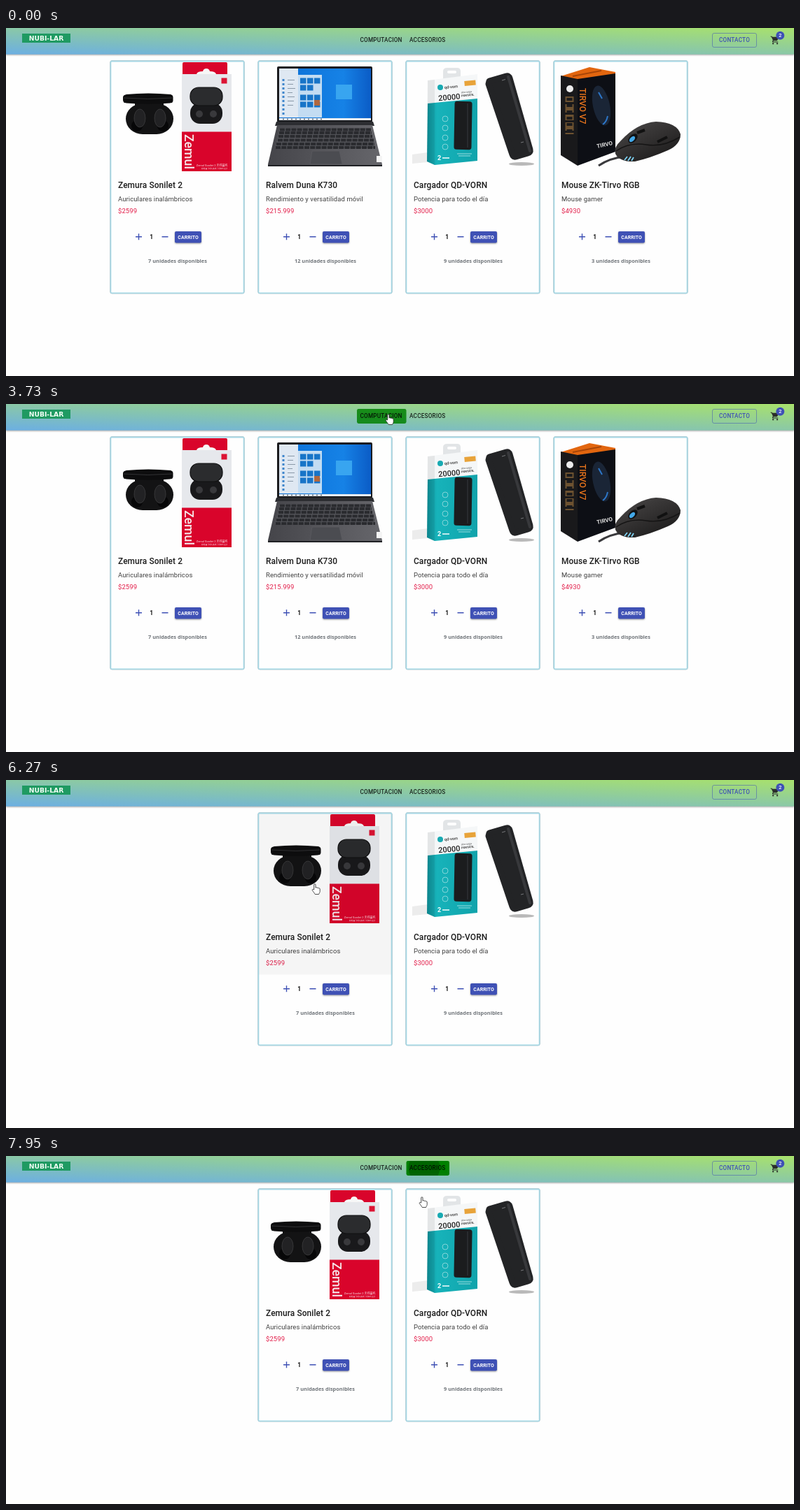
Recreate the animation shown at these times as an HTML page. Size 1125x498 px, loop 8000 ms.

```html
<!DOCTYPE html>
<html lang="es">
<head>
<meta charset="utf-8">
<style>
html, body { margin: 0; width: 100%; height: 100%; overflow: hidden; background: #fefefe; }
svg { display: block; font-family: Roboto, sans-serif; }
.units { font: 700 7.4px "Open Sans", sans-serif; fill: #70757a; }
.card { fill: #fefefe; stroke: #a6d8e5; stroke-width: 1.8; filter: drop-shadow(0 .8px .5px rgba(0,0,0,.4)); }
.btn { fill: #3f51b5; filter: drop-shadow(0 1px .8px rgba(0,0,0,.4)); }
</style>
</head>
<body>
<svg id="stage" width="1125" height="498" viewBox="0 0 1125 498">
<defs>
  <linearGradient id="bar" x1="0" y1="1" x2="1" y2="0"><stop stop-color="#6cafe2"/><stop offset="1" stop-color="#a8e16c"/></linearGradient>
  <linearGradient id="deck"><stop stop-color="#45454a"/><stop offset="1" stop-color="#66666b"/></linearGradient>
  <linearGradient id="screen"><stop stop-color="#0a6fd6"/><stop offset=".7" stop-color="#1682e6"/><stop offset="1" stop-color="#0b5cc6"/></linearGradient>
  <linearGradient id="teal"><stop stop-color="#0d8f98"/><stop offset=".2" stop-color="#17b3ba"/><stop offset="1" stop-color="#10a3ab"/></linearGradient>
  <linearGradient id="shell" x2=".8" y2="1"><stop stop-color="#4c4a4a"/><stop offset=".5" stop-color="#343232"/><stop offset="1" stop-color="#1a1919"/></linearGradient>

  <!-- earbuds and their box -->
  <g id="p0">
    <rect x="171" y="108" width="68" height="44" rx="24" ry="22" fill="#131314"/>
    <path d="M184 106H225V112H184Z" fill="#131314"/>
    <path d="M172 95Q203 92 235 95Q238.500 96 238.500 99V104Q238.500 107 234 107.500Q203 110 172 107.500Q167 107 167 103V99Q167 96 172 95Z" fill="#0d0d0e"/>
    <path d="M168 100Q203 103 237 100" fill="none" stroke="#3c3c3e" stroke-width=".8"/>
    <circle cx="187" cy="140" r="8" fill="#070708"/><circle cx="224" cy="140" r="8" fill="#070708"/>
    <g fill="#222224" stroke="#48484b" stroke-width=".6"><ellipse cx="191" cy="129" rx="8" ry="13"/><ellipse cx="220" cy="129" rx="8" ry="13"/></g>
    <path d="M252 67V51Q252 49 254 49H314Q316 49 316 51V67Z" fill="#d9042b"/>
    <path d="M251 66H322V150H251Z" fill="#e6e8ec"/>
    <path d="M272 66Q273 62 281 62Q282 58 286 58T291 62Q299 62 300 66Z" fill="#f7f7f7"/>
    <rect x="251" y="148.500" width="71" height="56.500" fill="#d9042b"/>
    <rect x="307.500" y="71.500" width="8" height="8" fill="#dc1433"/>
    <rect x="263" y="107" width="46" height="30" rx="14" fill="#19191b"/>
    <rect x="263" y="85" width="46" height="26" rx="12" fill="#2b2c2e" stroke="#101011" stroke-width="1.200"/>
    <circle cx="276" cy="123" r="5" fill="#39393c"/><circle cx="296" cy="123" r="5" fill="#39393c"/>
    <text transform="translate(255 152) rotate(90)" font-size="17.800" font-weight="500" fill="#f6e6e8">Zemul</text>
    <g fill="#f8dfe3" text-anchor="end" font-family="Roboto, 'Noto Sans CJK SC', sans-serif">
      <text x="316.500" y="198" font-size="4">Zemul Sonilet 2 无线耳机</text>
      <text x="316.500" y="202" font-size="2.800">充电盒 | 持久续航 | 分体式设计</text>
    </g>
  </g>

  <!-- laptop -->
  <g id="p1">
    <rect x="387" y="55" width="136" height="80" rx="2" fill="#1a1b1e"/>
    <rect x="390" y="58" width="131" height="74" fill="url(#screen)"/>
    <path d="M390 58h27v70h-27z" fill="#dfe8f2"/>
    <path d="M417 67h34v61h-34z" fill="#c3dcf2"/>
    <path d="M396 73v52" stroke="#3f86cc" stroke-width="3" stroke-dasharray="3 3"/>
    <path d="M402 74.500h10M402 80.500h8M402 86.500h11M402 92.500h7M402 98.500h10M402 104.500h9M402 110.500h8" stroke="#8a99a8"/>
    <path d="M420 75.500h30M420 85.500h20M420 99.500h30M420 109.500h30" stroke="#1774c8" stroke-width="8" stroke-dasharray="8.500 1.500"/>
    <rect x="440" y="103" width="8" height="8" fill="#b1683f"/>
    <rect x="471" y="81" width="23" height="21" fill="#38a5f0"/>
    <path d="M390 130.500h131" stroke="#e9edf1" stroke-width="3"/>
    <path d="M395 130.500h56" stroke="#58626c" stroke-width="1.500" stroke-dasharray="2 4"/>
    <path d="M386 134h138l2 6H384z" fill="#2c2d31"/>
    <path d="M387 139H523L537 195V198H374V195Z" fill="url(#deck)"/>
    <path d="M391 143H520L527 172H384Z" fill="#525358"/>
    <path d="M391 145.500H521M390 150H522M389 155H523M388 160.500H525M386 166H526M385 171H527" stroke="#2a2b2f" stroke-width="3.800" stroke-dasharray="7 1.200"/>
    <path d="M437 176H476L480 195H434Z" fill="#4b4c51" stroke="#606167" stroke-width=".5"/>
    <path d="M374 197h163" stroke="#202125" stroke-width="2"/>
    <rect x="529" y="183" width="8" height="9" fill="#f4f4f4"/>
  </g>

  <!-- power bank and its box -->
  <g id="p2">
    <path d="M580 181L602 178V192L580 194Z" fill="#ececec"/>
    <path d="M624 73V62Q624 57 630 57H644Q649 57 649 62V70Z" fill="#e2e5e7"/><rect x="630" y="61" width="13" height="4" rx="2" fill="#fff"/>
    <path d="M602 75L673 66V190L612 196L601 191Z" fill="#f5f7f8"/>
    <path d="M602 108L673 101V190L612 196L601 191Z" fill="url(#teal)"/>
    <path d="M602 75L612 74V196L601 191Z" fill="#000" opacity=".07"/>
    <circle cx="620" cy="85" r="4" fill="#18aab2"/>
    <g transform="rotate(-5 620 86)"><text x="626" y="87.500" font-size="5.600" font-weight="500" fill="#333">qd-vorn</text>
      <rect x="655" y="79" width="16" height="7" fill="#e8a33a"/>
      <text x="616" y="104" font-size="11" font-weight="500" fill="#222">20000</text>
      <text x="649" y="96" font-size="3.500" fill="#444">alta carga</text><text x="649" y="101" font-size="4" font-weight="700" fill="#333">PORTÁTIL</text></g>
    <rect x="640" y="105" width="25" height="69" rx="3.500" fill="#1b1c1e" transform="rotate(1 652 140)"/>
    <path d="M659 108V171" stroke="#393b3e" stroke-width="1"/>
    <path d="M644 180h21M646 183h17" stroke="#9adcdf"/>
    <g fill="none" stroke="#82d5d9"><circle cx="627" cy="130" r="4"/><circle cx="627" cy="143" r="4"/><circle cx="627" cy="157" r="4"/><circle cx="627" cy="170" r="4"/></g>
    <text x="616" y="189" font-size="9" font-weight="700" fill="#fff">2</text><path d="M623 186h10" stroke="#bfe9eb" stroke-width="2"/>
    <ellipse cx="736" cy="194.500" rx="18" ry="2.500" fill="#b9b9b9"/>
    <path d="M690 76L714 69Q718 68 719 72L748 174Q749 178 745 179L728 184Q724 185 723 181L689 80Z" fill="#232426" stroke="#232426" stroke-width="9" stroke-linejoin="round"/>
    <path d="M717 70L748 176" stroke="#38393c" stroke-width="4" stroke-linecap="round"/>
    <path d="M708 75l5-1.500M735 164l4-1" stroke="#77797c"/>
  </g>

  <!-- mouse and its box -->
  <g id="p3">
    <path d="M792 69L833 56L870 63V70L816 75Z" fill="#e2660f"/>
    <path d="M809 69L850 61" stroke="#a84608" stroke-width="2"/>
    <path d="M792 68L816 73V197L792 182Z" fill="#19191b"/>
    <path d="M816 73L870 65V177L816 197Z" fill="#0d0f15"/>
    <circle cx="805" cy="87" r="5" fill="#ededed"/>
    <path d="M804.500 98V152" stroke="#6d5230" stroke-width="12" stroke-dasharray="8 3 12 3"/>
    <path d="M804.500 100V150" stroke="#1b1b1d" stroke-width="8" stroke-dasharray="4 5"/>
    <ellipse cx="850" cy="111" rx="12" ry="29" fill="#1a2536" transform="rotate(-12 850 111)"/>
    <path d="M846 92l5 9M859 126q-2 9-7 12" stroke="#2d76c8" stroke-width="2" fill="none"/>
    <text transform="translate(819 86) rotate(90)" font-size="12" font-weight="500" fill="#e8741c">TIRVO V7</text>
    <text transform="translate(844 172) rotate(-12)" font-size="8" font-weight="700" fill="#ddd">TIRVO</text>
    <path d="M884 184Q862 186 846 197" fill="none" stroke="#3a3a3d" stroke-width="3"/>
    <path d="M870 180Q867 171 878 161Q901 136 928 134Q958 135 963 152Q963 167 945 175Q920 186 898 191Q876 192 870 180Z" fill="url(#shell)"/>
    <path d="M871 176Q890 163 914 167T962 156" fill="none" stroke="#151414" stroke-width="1.500"/>
    <path d="M901 150L912 146M930 163L944 156" stroke="#111" stroke-width="4"/>
    <ellipse cx="895" cy="158" rx="8" ry="5" fill="#101113" transform="rotate(-45 895 158)"/>
    <ellipse cx="894" cy="159" rx="5" ry="3" fill="#42a8e8" transform="rotate(-45 894 159)"/>
    <path d="M883 189l4-5M888 190l4-6M893 190l3-5" stroke="#7fd4f5" stroke-width="1.800"/>
  </g>

  <g id="qty">
    <path d="M185 298.700h9M189.500 294.200v9M222.500 298.700h9" stroke="#3f51b5" stroke-width="1.400"/>
    <text x="207.700" y="302.300" text-anchor="middle" font-size="8.400" font-weight="700" fill="#111">1</text>
    <rect class="btn" x="241" y="291" width="38" height="16.500" rx="2"/>
    <text x="260.100" y="301.800" text-anchor="middle" font-size="6.900" font-weight="700" letter-spacing=".12" fill="#fff">CARRITO</text>
  </g>
  <clipPath id="navClip"><path id="navBox"/></clipPath>
</defs>
<g id="pages"></g>
<rect id="shade" y="48" width="189" height="230.500"/>
<rect width="1125" height="37.700" fill="url(#bar)" style="filter:drop-shadow(0 1px 1.200px rgba(0,0,0,.35))"/>
<rect x="23" y="8" width="69" height="13" fill="#1f9a62"/>
<text x="57.500" y="18" text-anchor="middle" font-size="9.200" style="font-family:'DejaVu Sans',sans-serif;font-weight:700" fill="#f2fff6">NUBI-LAR</text>
<rect id="nav0" x="501" y="7" width="70.500" height="21" rx="2.400" fill="#008000"/>
<rect id="nav1" x="571.500" y="7" width="61.500" height="21" rx="2.400" fill="#008000"/>
<g clip-path="url(#navClip)"><circle id="ripple" cy="17"/></g>
<g font-size="8.200" font-weight="500" letter-spacing=".22" fill="#000" fill-opacity=".82">
  <text x="505.500" y="20">COMPUTACION</text><text x="576" y="20">ACCESORIOS</text>
  <text x="1018" y="20" fill="#3f51b5" fill-opacity="1">CONTACTO</text>
</g>
<rect x="1008.500" y="7.500" width="63" height="20" rx="2.400" fill="none" stroke="#3f51b5" stroke-opacity=".5"/>
<path transform="translate(1091 10.500) scale(.593)" fill="#2b2f2b" d="M7 18c-1.100 0-2 .9-2 2s.9 2 2 2 2-.9 2-2-.9-2-2-2zM1 2v2h2l3.600 7.600-1.350 2.450c-.16.28-.25.6-.25.950 0 1.100.9 2 2 2h12v-2H7.420l-.2-.3 1-1.700h7.300c.75 0 1.400-.4 1.750-1L20.900 5.500 20 4H5.200l-.93-2zm16 16c-1.100 0-2 .9-2 2s.9 2 2 2 2-.9 2-2-.9-2-2-2z"/>
<circle cx="1105.300" cy="10.700" r="6" fill="#3f51b5"/>
<text x="1105.300" y="13.300" text-anchor="middle" font-size="7.200" font-weight="500" fill="#fff">2</text>
<path id="cursor" stroke-linejoin="round"/>
</svg>
<script>
const $ = id => document.getElementById(id);
const clamp = v => Math.max(0, Math.min(1, v));
const text = (x, y, size, s, attrs = '') => `<text x="${x}" y="${y}" font-size="${size}" letter-spacing="${size * .008}" ${attrs}>${s}</text>`;
const RED = 'fill="#e21c48"', GREY = 'fill="#404040"', DARK = 'fill="#1c1c1c"';

const products = [
  ['Zemura Sonilet 2', 'Auriculares inalámbricos', '$2599', 7],
  ['Ralvem Duna K730', 'Rendimiento y versatilidad móvil', '$215.999', 12],
  ['Cargador QD-VORN', 'Potencia para todo el día', '$3000', 9],
  ['Mouse ZK-Tirvo RGB', 'Mouse gamer', '$4930', 3]
];
const slot = i => 149 + 211 * i;
const frame = (x, w, h) => `<rect class="card" x="${x + .4}" y="47.500" width="${w - .8}" height="${h - 1.2}" rx="1.500"/>`;

function card(item, place) {
  const [name, info, price, stock] = products[item], x = slot(place);
  return frame(x, 191, 333) +
    `<use href="#p${item}" x="${x - slot(item)}"/><use href="#qty" x="${x - 149}"/>` +
    text(x + 11, 229, 11.9, name, 'font-weight="500" ' + DARK) +
    text(x + 11, 248, 9.49, info, GREY) +
    text(x + 11, 265, 9.49, price, RED) +
    `<text class="units" x="${x + 96}" y="336" text-anchor="middle">${stock} unidades disponibles</text>`;
}

const story = `Los auriculares plegables Zemura hacen que la
música sea aún más agradable. A prueba de
sudor y salpicaduras te permite disfrutar de
actividades al aire libre. Este auricular cuenta
con un diseño ultra elegante, mano de obra
exquisita, ligero y portátil, fácil de llevar. La
estructura dinámica de unidades de doble
bobina te ofrecerá un sonido cristalino. •
Compatibilidad con eLU y Tarnelo • Soporte
para códec SBC • Resistencia al agua IPX5 •
Cancelación de ruido`.split('\n');
const specs = ['Bateria: 300mh', 'Compatibilidad: Pc, teléfono móvil', 'Conectividad: Wireless'];

const detail = frame(277, 568, 421) +
  text(288, 84, 28.5, products[0][0], DARK) +
  text(288, 124, 20.2, '$ 2599', RED) +
  story.map((s, i) => text(288, 153 + 18.9 * i, 11.9, s, 'font-weight="500" ' + DARK)).join('') +
  specs.map((s, i) => text(288, 361 + 17.3 * i, 9.4, s, GREY)).join('') +
  '<use href="#qty" x="137" y="124.300"/><use href="#p0" transform="translate(540 -16.800) scale(1.67) translate(-149 0)"/>' +
  '<text class="units" x="421.500" y="424.500">7 unidades disponibles</text>';

const pages = [
  products.map((_, i) => card(i, i)).join(''),
  card(1, 1) + card(3, 2),
  card(0, 1) + card(2, 2),
  detail
];
$('pages').innerHTML = pages.map(p => `<g>${p}</g>`).join('');
const groups = [...$('pages').children];

// [time, page], [time, x, y], [x, on, off], [button, on, off], [time, x, button]
const visits = [[0, 0], [4130, 1], [5570, 2], [6470, 3], [7820, 2]];
const track = [
  [300, 1047, 488], [790, 357, 391], [990, 357, 391], [1270, 225, 431], [1550, 46, 330], [1830, 113, 156],
  [2180, 311, 168], [2520, 311, 168], [2940, 292, 129], [3290, 448, 62], [3370, 448, 62], [3680, 546, 15],
  [4510, 546, 15], [5070, 593, 17], [5600, 593, 17], [6140, 441, 149], [7050, 441, 149], [7540, 598, 17],
  [7890, 597, 20], [7950, 594, 59], [8000, 594, 59]
];
const shades = [[150, 1960, 3120], [361, 3150, 3530], [361, 5860, 6470], [572, 7950, 8200]];
const navs = [[0, 3580, 4790], [1, 4800, 5680], [1, 7470, 7950]];
const clicks = [[3990, 546, 0], [5430, 593, 1], [7700, 597, 1]];
// The picture refreshes in short bursts of 70 ms steps.
const bursts = [0, 300, 1060, 1900, 2590, 3400, 4000, 4580, 5440, 6270, 7120, 7950];

const shapes = {
  arrow: 'M0 0V11L2.500 8.600 4.200 12.300 5.800 11.600 4.100 8H7.700Z',
  hand: 'M-1.300 8V.9C-1.300-.6 1-.6 1 .9V5.200C1.200 4.300 3.200 4.400 3.300 5.600 3.600 4.800 5.300 5 5.400 6.100 5.800 5.500 7.200 5.800 7.200 7V10.500C7.200 12 6 13 5.600 14.500H.2C-.5 13-2.600 10.600-3.600 8.900-4.300 7.600-2.900 6.900-1.300 8Z',
  beam: 'M-1-3H3M1-3V5M-1 5H3'
};
const latest = (list, t, k = 0) => list.filter(e => e[k] <= t).pop();
const active = list => t => list.some(([, on, off]) => on <= t && t < off);
const overCard = active(shades), overNav = active(navs);
const ramp = (t, on, off) => clamp((t - on) / 120) * clamp(1 - (t - off) / 120);

function pointer(t) {
  const i = track.findIndex(k => k[0] > t);
  const [t0, x0, y0] = track[i - 1], [t1, x1, y1] = track[i], p = (t - t0) / (t1 - t0);
  return [x0 + (x1 - x0) * p, y0 + (y1 - y0) * p];
}

function set(id, attrs) {
  for (const k in attrs) $(id).setAttribute(k, attrs[k]);
}

function draw(now) {
  let t = now % 8000;
  const start = bursts.filter(b => b <= t).pop();
  t = start + Math.floor((t - start) / 70) * 70;

  const page = latest(visits, t)[1];
  groups.forEach((g, i) => g.style.display = i === page ? '' : 'none');

  const shade = latest(shades, t, 1);
  set('shade', shade && page < 3
    ? { x: shade[0], opacity: .036 * ramp(t, shade[1], shade[2]) }
    : { opacity: 0 });
  [0, 1].forEach(n => set('nav' + n, {
    opacity: Math.max(...navs.filter(v => v[0] === n).map(v => ramp(t, v[1], v[2])))
  }));

  const click = latest(clicks, t);
  if (click) {
    const age = t - click[0];
    set('ripple', { cx: click[1], r: 36 * clamp(age / 400), opacity: .22 * clamp((650 - age) / 350) });
    set('navBox', { d: click[2] ? 'M571.500 7h61.500v21h-61.500z' : 'M501 7h70.500v21h-70.500z' });
  } else set('ripple', { r: 0 });

  if (t < 300) return set('cursor', { opacity: 0 });
  const [x, y] = pointer(t);
  const kind = page === 3 && x < 540 && y > 47 ? 'beam' : overCard(t) || overNav(t) ? 'hand' : 'arrow';
  set('cursor', {
    opacity: 1, d: shapes[kind], transform: `translate(${x} ${y})`,
    fill: kind === 'beam' ? 'none' : '#fff', stroke: '#222', 'stroke-width': .8
  });
}

const begin = performance.now();
(function loop() {
  draw(performance.now() - begin);
  requestAnimationFrame(loop);
})();
</script>
</body>
</html>
```
